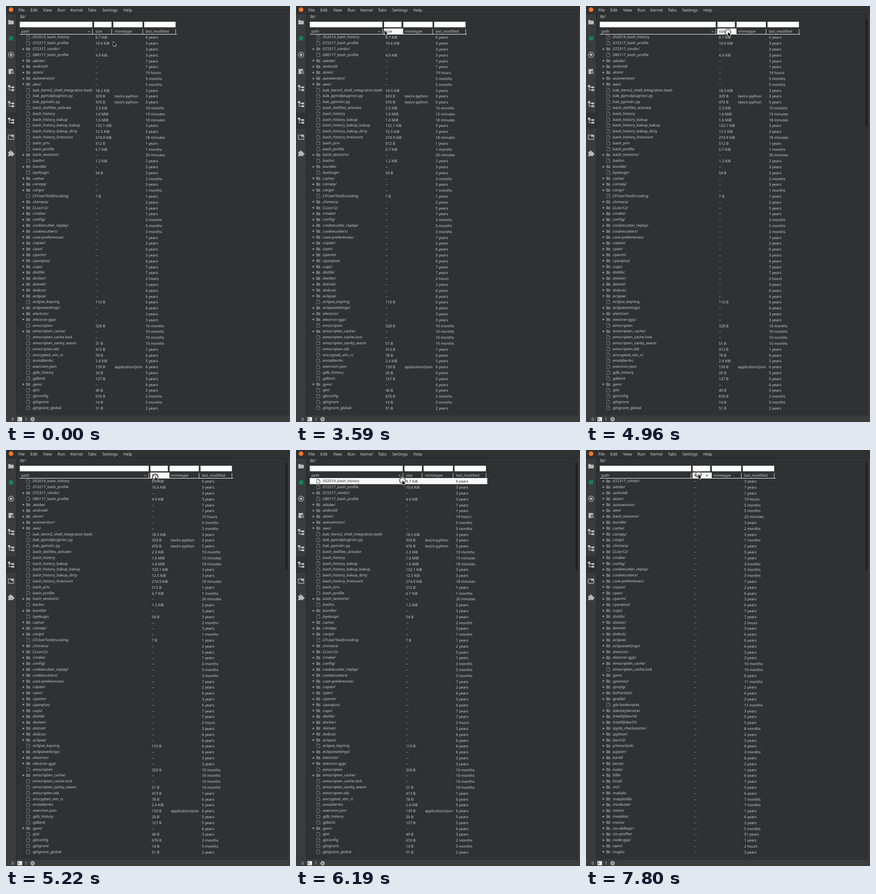
Recreate the animation shown at these times as an HTML page. Size 619 by 905 pixels, loop 8000 ms.

```html
<!DOCTYPE html>
<html lang="en">
<head>
<meta charset="utf-8">
<title>File tree column resize</title>
<style>
html, body { margin: 0; width: 100%; height: 100%; overflow: hidden; background: #2f3133; }
svg { display: block; width: 619px; height: 905px; }
text { font: 8.08px "Noto Sans", "Open Sans", sans-serif; fill: #cfcfcf; text-rendering: geometricPrecision; white-space: pre; }
.menu { font-size: 8.8px; fill: #d8d8d8; }
.plus { font-size: 8.8px; font-weight: 600; }
.folder { fill: #6d6f70; }
.file { fill: none; stroke: #858788; stroke-width: .9; }
.icon { fill: #b8b9ba; }
.line { fill: none; stroke: #b8b9ba; stroke-width: 1.3; }
.white { fill: #fff; }
.sort { fill: #7b7d7e; }
.hl { fill: #f8f8f8; visibility: hidden; }
[data-hover=path] .hl.path, [data-hover=size] .hl.size, [data-hover=row] .hl.row { visibility: visible; }
[data-hover=path] text.path, [data-hover=size] text.size, [data-hover=row] text.row { fill: #222; }
[data-hover=row] .file.row { stroke: #444; }
.cursor { fill: #000; stroke: #fff; stroke-width: 1.2; paint-order: stroke; }
</style>
</head>
<body>
<svg viewBox="0 0 619 905"></svg>
<script>
const LOOP = 8000, ROW = 12.8;

// name [size] age [mimetype]
const parse = s => s.trim().split('\n').map(line => {
  const [name, ...rest] = line.split(' ');
  const size = /[BKM]$/.test(rest[0]) && /^[\d.]+[BK]$|\.\d+M$/.test(rest[0]) ? rest.shift() : '';
  return { name, size, age: rest[0], mime: rest[1] || '' };
});

const byPath = parse(`
.052014_bash_history 8.7K 6y
.072217_bash_profile 10.6K 3y
.072317_vimdir/ 3y
.080117_bash_profile 4.9K 3y
.adobe/ 7y
.android/ 1y
.atom/ 19h
.autoversion/ 5M
.aws/ 5M
.bak_iterm2_shell_integration.bash 18.5K 3y
.bak_pymolpluginsrc.py 329B 3y text/x-python
.bak_pymolrc.py 476B 5y text/x-python
.bash_dotfiles_activate 2.3K 10M
.bash_history 1.6M 13m
.bash_history_bakup 1.6M 18m
.bash_history_bakup_bakup 132.1K 3y
.bash_history_bakup_dirty 12.5K 3y
.bash_history_linecount 274.9K 18m
.bash_priv 512B 1y
.bash_profile 6.7K 1M
.bash_sessions/ 20m
.bashrc 1.2K 2y
.bundle/ 3y
.byebugrc 54B 3y
.cache/ 2M
.canopy/ 3y
.cargo/ 1M
.CFUserTextEncoding 7B 1y
.chimera/ 2y
.CLion12/ 5y
.cmake/ 1y
.config/ 3M
.cookiecutter_replay/ 5M
.cookiecutters/ 3M
.coot-preferences/ 7y
.copasi/ 2y
.cpan/ 6y
.cpanm/ 3y
.cpanplus/ 6y
.cups/ 7y
.distlib/ 7y
.docker/ 2h
.dotnet/ 3y
.dvdcss/ 6y
.eclipse/ 6y
.eclipse_keyring 110B 6y
.eclipsesettings/ 6y
.electron/ 3y
.electron-gyp/ 3y
.emscripten 328B 10M
.emscripten_cache/ 10M
.emscripten_cache.lock 10M
.emscripten_sanity_wasm 51B 10M
.emscripten.old 413B 1y
.encrypted_vim_rc 78B 6y
.enstaller4rc 2.4K 5y
.exercism.json 139B 6y application/json
.gdb_history 20B 5y
.gdbinit 127B 5y
.gem/ 6y
.gist 40B 3y
.gitconfig 676B 2M
.gitignore 14B 5M
.gitignore_global 51B 2y`);

const bySize = byPath.filter(r => !r.size).concat(parse(`
.gnome2/ 11M
.gnupg/ 2y
.GoPanda2/ 6y
.gradle/ 3y
.gtk-bookmarks 11M
.IdentityService/ 3y
.IntelliJIdea14/ 5y
.IntelliJIdea15/ 5y
.ipynb_checkpoints/ 8M
.ipython/ 2y
.iterm2/ 3y
.jchessclock/ 6y
.jupyter/ 3M
.karaf/ 6y
.keras/ 2y
.kube/ 1y
.lldb/ 6y
.local/ 7y
.m2/ 5y
.matlab/ 6y
.matplotlib/ 7M
.minikube/ 7M
.minio/ 1y
.modelio/ 6y
.mono/ 3y
.nix-defexpr/ 5M
.nix-profile/ 51y
.node-gyp/ 1y
.npm/ 2h
.nuget/ 3y`));

const UNITS = { y: 'years', M: 'months', m: 'minutes', h: 'hours', B: 'B', K: 'KiB' };
const sizeText = s => !s ? '--' : s.endsWith('M') ? s.slice(0, -1) + ' MiB' : s.slice(0, -1) + ' ' + UNITS[s.at(-1)];
const ageText = (s, extra = 0) => s.at(-1) === 'm'
  ? parseInt(s) + extra + ' minutes' : parseInt(s) + ' ' + UNITS[s.at(-1)];

const text = (x, y, s, cls = '') => `<text x="${x}" y="${y}" class="${cls}">${s}</text>`;
const rect = (x, y, w, h, attrs) => `<rect x="${x}" y="${y}" width="${w}" height="${h}" ${attrs}/>`;
const path = (d, attrs) => `<path d="${d}" ${attrs}/>`;
const folder = (x, y, cls) => path(`M${x} ${y}h3.4l1 1.1h4.4v6h-8.8z`, `class="${cls}"`);

const names = rows => rows.map((r, i) => {
  const y = 70.4 + i * ROW, cls = i ? '' : 'row';
  const icon = r.name.endsWith('/')
    ? text(35.2, y + .6, '+', 'plus') + folder(44, y - 6.3, 'folder')
    : path(`M45 ${y - 7}h4.3l2.8 2.8v5.6h-7.1zM49.3 ${y - 7}v2.8h2.8`, `class="file ${cls}"`);
  return icon + text(56.6, y, r.name, cls);
}).join('');

const details = (rows, extra) => rows.map((r, i) => {
  const y = 71.4 + i * ROW, cls = i ? '' : 'row';
  return text(195, y, sizeText(r.size), cls) + (r.mime && text(236.8, y, r.mime, cls))
    + text(304.2, y, ageText(r.age, extra), r.age.endsWith('m') ? 'age' : cls);
}).join('');

const tree = y => path(`M4 ${y - 6}h5.5v4h-5.5zM12 ${y - 3}h6v4h-6zM12 ${y + 3}h6v4h-6z`, 'class="icon"')
  + path(`M7 ${y - 2}v7h5M7 ${y - 1}h5`, 'class="line"');

const chrome = rect(0, 17, 22, 874, 'fill="#393b3c"') + rect(0, 232, 22, 35, 'fill="#2f3133"')
  + rect(0, 17, 619, 1, 'fill="#232526"') + rect(22, 17, 1, 874, 'fill="#232526"')
  + rect(616, 17, 3, 874, 'fill="#3b3d3e"') + rect(0, 891, 619, 14, 'fill="#3b3c3d"')
  + rect(609, 28, 5, 233, 'rx="1" fill="#1f2122" id="thumb"')
  + '<circle cx="11" cy="8" r="5" fill="#f37726"/>'
  + [['File', 27], ['Edit', 53], ['View', 81], ['Run', 112.5], ['Kernel', 140.5], ['Tabs', 178.5], ['Settings', 210], ['Help', 255.7]]
    .map(([s, x]) => text(x, 11.6, s, 'menu')).join('')
  + path('M5 30.5h4.5l1.4 1.4h6v8h-11.9z', 'class="icon"')
  + rect(6.5, 66, 9, 9, 'fill="#17805a"')
  + '<circle cx="11" cy="106" r="5.8" class="line"/>' + rect(8.5, 103.5, 5, 5, 'class="icon"')
  + path('M5.5 137h10v3h-3.5l-2 3 2 3-1 2h-5.5z', 'class="icon"')
  + '<circle cx="13" cy="143.5" r="2.6" class="line"/>' + path('M15 145.5l2.5 2.5', 'class="line"')
  + tree(178) + tree(213) + tree(249)
  + rect(5, 280.5, 12, 9.5, 'rx="1" class="line"') + rect(11, 281, 6, 3.5, 'class="icon"')
  + path('M5 317h3.5a2 2 0 1 1 3.6 0h3.4v3.3a2 2 0 1 1 0 3.5v3h-3.3a2 2 0 0 0-3.7 0h-3.5v-3.3a2 2 0 0 0 0-3.6z', 'class="icon"')
  + folder(31, 19.5, 'folder') + text(40.8, 25.4, '/')
  + text(12, 902.2, '0', 'menu') + rect(25, 894.5, 10, 9, 'fill="#eee"')
  + '<text x="26" y="901.3" style="font-size:6px;fill:#222">$_</text>' + text(41, 902.2, '1', 'menu')
  + '<circle cx="58" cy="899" r="3.6" fill="none" stroke="#ddd" stroke-width="1.8"/>' + rect(56.8, 897.8, 2.4, 2.4, 'fill="#ddd"');

const svg = document.querySelector('svg');
svg.innerHTML = chrome
  + rect(30, 49, 0, 12.5, 'class="hl path" data-w="161.5"') + rect(30, 61.5, 0, 12.8, 'class="hl row" data-w="342.5"')
  + rect(30, 34.3, 0, 12, 'class="white" data-w="158.3"') + rect(30, 61, 0, 1, 'class="white" data-w="342.5"')
  + text(33.4, 58.2, 'path', 'path')
  + `<g class="by-path">${names(byPath)}</g><g class="by-size">${names(bySize)}</g>`
  + '<g id="columns">' + rect(191.7, 49, 41.8, 12.5, 'class="hl size"')
  + [[192, 38], [233.8, 63.8], [301.2, 68.4]].map(([x, w]) => rect(x, 34.3, w, 12, 'class="white"')).join('')
  + [188, 229.8, 297.4, 369.2].map(x => rect(x, 50, 1, 11, 'fill="#ddd"')).join('')
  + text(195, 58.2, 'size', 'size') + text(236.8, 58.2, 'mimetype') + text(304.2, 58.2, 'last_modified')
  + path('M177.8 57h6.4l-3.2-3.4z', 'class="sort by-path"') + path('M219.6 57h6.8l-3.4-3.6z', 'class="sort by-size"')
  + `<g class="by-path">${details(byPath)}</g><g class="by-size">${details(bySize, 2)}</g></g>`
  + '<g id="pointer"><g id="press" fill="none"><circle r="6.4" stroke="#fff" stroke-width="2.2"/><circle r="6.2" stroke="#000" stroke-width="1.2"/></g>'
  + path('M0 0V9.2L2.1 7.3 3.6 10.6 5.1 9.9 3.7 6.8H6.6Z', 'class="cursor" id="arrow"')
  + path('M-5.5 0L-3-2.5V2.5ZM5.5 0L3-2.5V2.5ZM-4-.6H4V.6H-4ZM-.7-5H.7V5H-.7Z', 'class="cursor" id="resize"') + '</g>';

const $ = id => document.getElementById(id);
const all = sel => [...svg.querySelectorAll(sel)];
const show = (el, on) => el.style.display = on ? '' : 'none';
const sortedByPath = all('.by-path'), sortedBySize = all('.by-size'), stretched = all('[data-w]');
const ages = all('.by-path .age').map(el => [el, parseInt(el.textContent)]);

// time, pointer x, pointer y, column offset
const POSES = [
  [0, 234, 78, 0], [990, 234, 78, 0], [1870, 190, 57, 0], [1950, 189, 55.5, 0], [2130, 189, 55.5, 0],
  [2220, 189, 55, 0], [2390, 186, 55.5, 0], [2560, 186, 55.5, 0], [2810, 189, 53, 0], [2880, 189, 53, 0],
  [3140, 194, 54, 0], [3500, 194, 54, 0], [3770, 191, 52, 0], [4030, 191, 52, 0], [4510, 208.8, 52, 15.6],
  [4870, 289, 56, 79.5], [4960, 309.5, 56.7, 94.5], [5310, 341, 60, 151], [5390, 341, 60, 151],
  [5660, 278.7, 65.5, 107.3], [6190, 232, 66.2, 44.4], [6280, 228, 66.2, 43], [6460, 225, 66.2, 40.6],
  [7090, 225, 66.2, 40.6], [7530, 245, 53, 40.6]
];
const HOVERS = [[0, ''], [2970, 'path'], [3140, 'size'], [3680, 'path'], [4870, 'size'], [5480, 'row'], [6730, ''], [7360, 'size']];
const within = (t, a, b) => t >= a && t < b;

// The picture is refreshed in steps of about 88 ms.
function pose(t) {
  const i = POSES.findLastIndex(p => p[0] <= t), a = POSES[i], b = POSES[i + 1];
  if (!b) return a.slice(1);
  const span = b[0] - a[0], steps = Math.max(1, Math.round(span / 88));
  const u = Math.floor((t - a[0]) / span * steps) / steps;
  return [1, 2, 3].map(k => a[k] + (b[k] - a[k]) * u);
}

function draw(now) {
  const t = now % LOOP, [x, y, dx] = pose(t);
  svg.dataset.hover = HOVERS.findLast(h => h[0] <= t)[1];
  $('columns').setAttribute('transform', `translate(${dx})`);
  stretched.forEach(el => el.setAttribute('width', +el.dataset.w + dx));
  sortedByPath.forEach(el => show(el, t < 7800));
  sortedBySize.forEach(el => show(el, t >= 7800));
  ages.forEach(([el, n]) => el.textContent = n + (t >= 6730 ? 2 : 0) + ' minutes');

  const resizing = within(t, 2650, 2970) || within(t, 3680, 4870);
  $('pointer').setAttribute('transform', `translate(${x} ${y})`);
  show($('resize'), resizing);
  show($('arrow'), !resizing);
  show($('press'), within(t, 4120, 6460) || t >= 7530);
  show($('thumb'), t >= 4120);
  requestAnimationFrame(draw);
}
requestAnimationFrame(draw);
</script>
</body>
</html>
```
